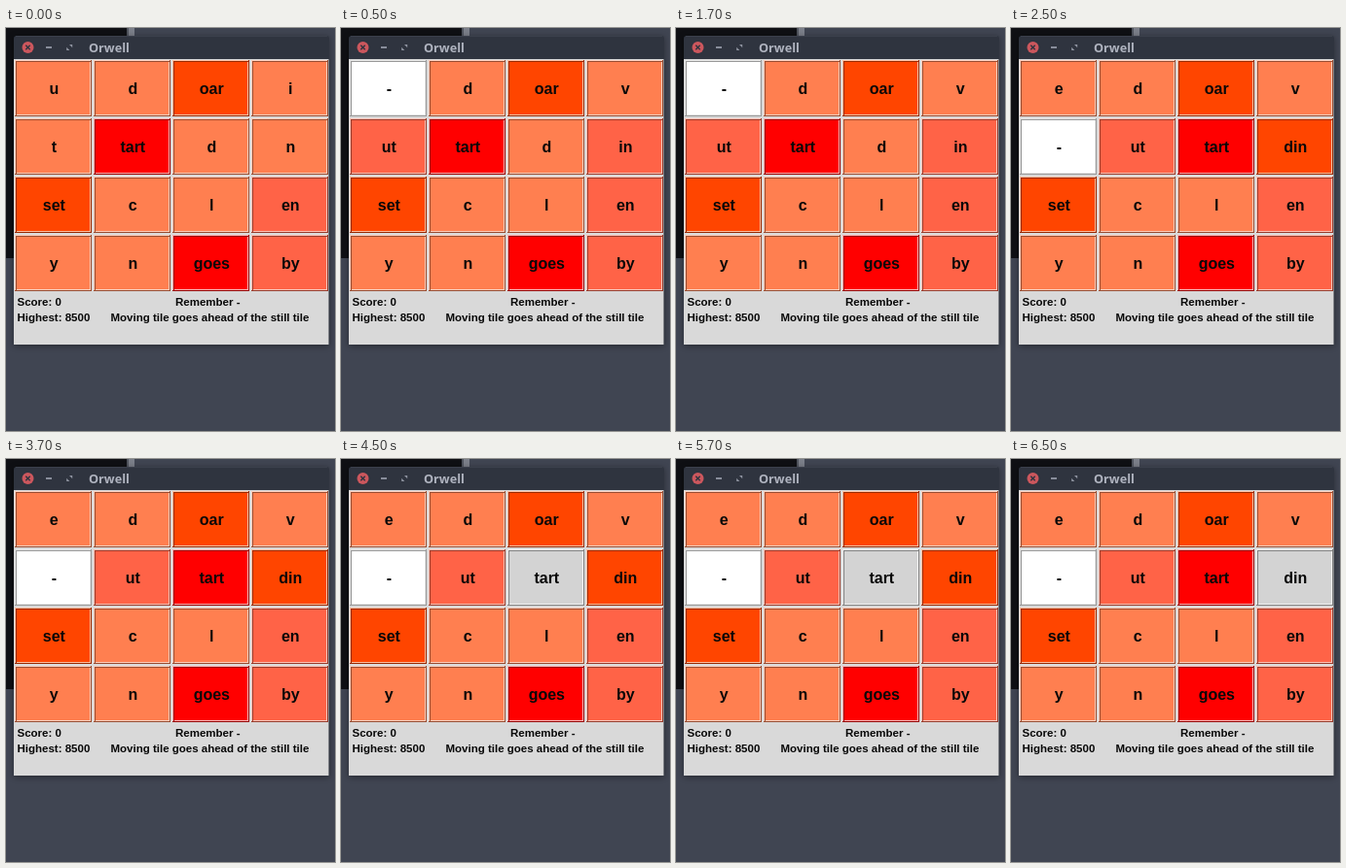
An HTML page for the animation above (8000 ms loop, 338 by 415 pixels).

```html
<!DOCTYPE html>
<html lang="en">
<head>
<meta charset="utf-8">
<title>Word tiles</title>
<style>
html, body { margin: 0; width: 100%; height: 100%; overflow: hidden; background: #404552; }
svg { display: block; width: 100vw; height: 100vh; }
text { font-family: "Liberation Sans", Arial, sans-serif; font-weight: bold; fill: #080808; }
.word { font-size: 16px; text-anchor: middle; }
.info { font-size: 11.5px; }
.title { font: bold 12.7px "Open Sans", "Noto Sans", sans-serif; fill: #afb3bf; }
</style>
</head>
<body>
<svg viewBox="0 0 338 415" preserveAspectRatio="none">
  <defs>
    <filter id="soft" x="-10%" y="-10%" width="120%" height="120%">
      <feGaussianBlur stdDeviation="3"/>
    </filter>
  </defs>
  <rect width="338" height="415" fill="#404552"/>
  <path d="M0 0H124V9H9V237H0Z" fill="#0f1014"/>
  <rect x="124" width="2" height="9" fill="#50545e"/>
  <rect x="126" width="6" height="9" fill="#7b7f89"/>
  <rect x="8" y="9" width="324" height="319" fill="#000" opacity=".35" filter="url(#soft)"/>

  <path d="M8 326V11Q8 8 11 8H329Q332 8 332 11V326Z" fill="#2f343f"/>
  <path d="M10 8.5H330" stroke="#3b404c"/>
  <circle cx="22.5" cy="20" r="6" fill="#cc575d"/>
  <path d="M20.3 17.8l4.4 4.4m0-4.4l-4.4 4.4" stroke="#2f343f" stroke-width="1.5"/>
  <path d="M41 20h6" stroke="#9a9fac" stroke-width="1.7"/>
  <path d="M65 17h3.2v3.2zM62.2 19.8v3.2h3.2z" fill="#8f94a1"/>
  <text class="title" x="85" y="24.6">Orwell</text>

  <rect x="8" y="32" width="323.5" height="294" fill="#d9d9d9"/>
  <g id="board"></g>
  <text class="info" x="11.5" y="285.5">Score: 0</text>
  <text class="info" x="174" y="285.5">Remember -</text>
  <text class="info" x="11.5" y="302.3">Highest: 8500</text>
  <text class="info" x="107.5" y="302.3">Moving tile goes ahead of the still tile</text>
</svg>
<script>
const LOOP = 8000;
const NS = "http://www.w3.org/2000/svg";

// fill, light edge, dark edge
const skins = {
  1: ["#ff7f50", "#ffcfbd", "#994c30"],
  2: ["#ff6347", "#ffc4b8", "#993b2b"],
  3: ["#ff4500", "#ffbfa2", "#992900"],
  4: ["#ff0000", "#ffb4b4", "#990000"],
  blank: ["#ffffff", "#e6e6e6", "#999999"],
  active: ["#d3d3d3", "#f4f4f4", "#7f7f7f"]
};

const top2 = "e d oar v - ut tart din";
const rest = " set c l en y n goes by";
const states = [
  { at: 0, words: "u d oar i t tart d n" + rest },
  { at: 500, words: "- d oar v ut tart d in" + rest },
  { at: 2500, words: top2 + rest },
  { at: 4500, words: top2 + rest, active: 6 },
  { at: 6500, words: top2 + rest, active: 7 }
];

const board = document.getElementById("board");

function add(tag, attrs) {
  const el = document.createElementNS(NS, tag);
  for (const k in attrs) el.setAttribute(k, attrs[k]);
  board.appendChild(el);
  return el;
}

function makeTile(i) {
  const x = 9 + 81 * (i % 4), y = 33 + 60 * Math.floor(i / 4);
  const w = 79, h = 58;
  const layer = (d, dw) => add("rect", { x: x + d, y: y + d, width: w - dw, height: h - dw });
  // nested rectangles form the ridge
  const layers = [layer(0, 0), layer(0, 1), layer(1, 2), layer(2, 3), layer(2, 4)];
  const label = add("text", { class: "word", x: x + 40.3, y: y + 35.3 });
  return (word, active) => {
    const key = active ? "active" : word === "-" ? "blank" : word.length;
    const [fill, light, dark] = skins[key];
    [dark, light, dark, light, fill].forEach((c, n) => layers[n].setAttribute("fill", c));
    label.textContent = word;
  };
}

const tiles = Array.from({ length: 16 }, (_, i) => makeTile(i));
let shown = null;

function draw(ms) {
  const t = ms % LOOP;
  const state = states.filter(s => s.at <= t).pop();
  if (state === shown) return;
  shown = state;
  const words = state.words.split(" ");
  tiles.forEach((paint, i) => paint(words[i], i === state.active));
}

const start = performance.now();
function tick() {
  draw(performance.now() - start);
  requestAnimationFrame(tick);
}
tick();
</script>
</body>
</html>
```
